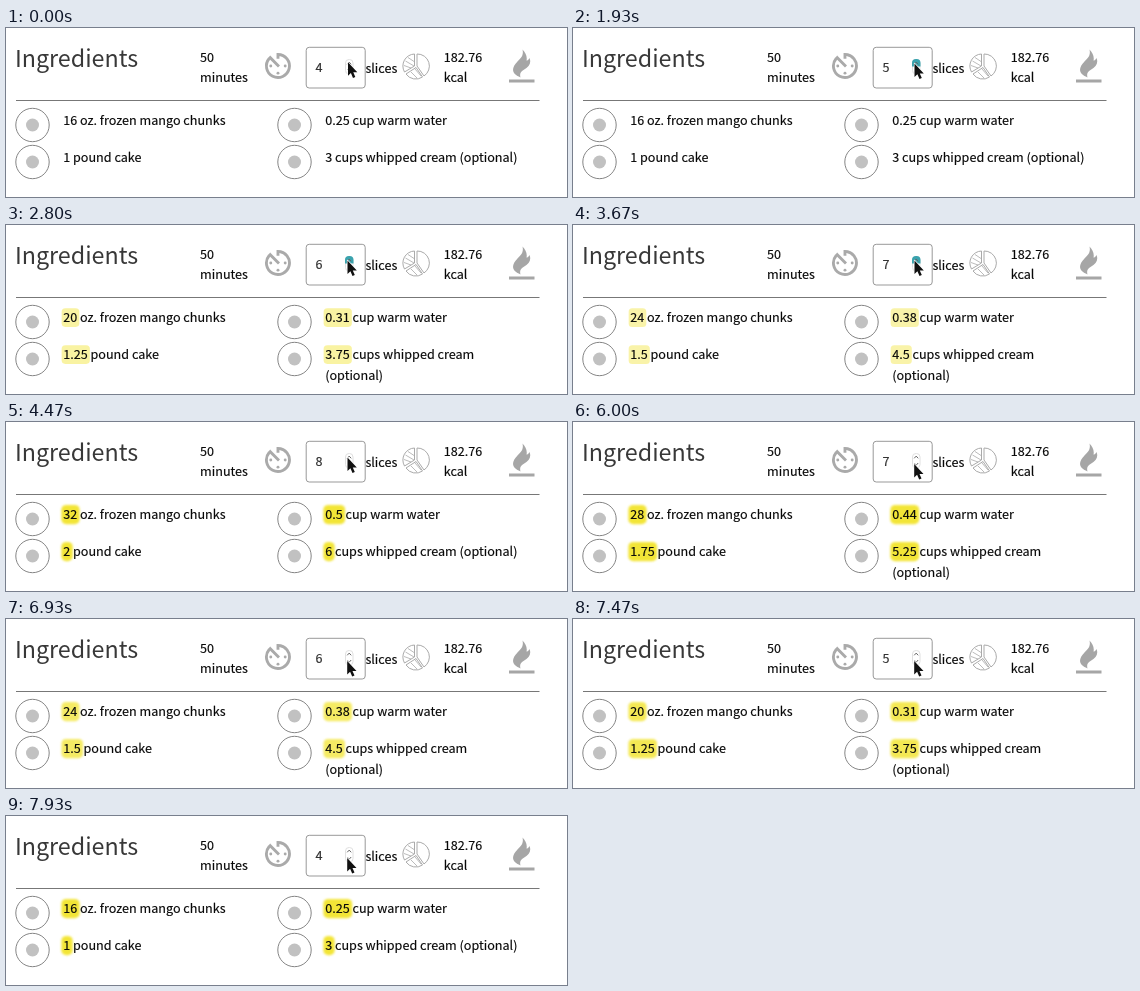
Recreate the animation shown at these times as an HTML page. Size 561 by 169 pixels, loop 8000 ms.

```html
<!DOCTYPE html>
<html lang="en">
<head>
<meta charset="utf-8">
<title>Ingredients</title>
<style>
html, body { margin: 0; width: 100%; height: 100%; overflow: hidden; background: #fff; }
svg { display: block; width: 561px; height: 169px; }
text {
  font: 12.6px "Noto Sans CJK JP", "Noto Sans CJK SC", "Noto Sans CJK", "Noto Sans", sans-serif;
  fill: #080808;
  stroke: #080808;
  stroke-width: .15px;
  white-space: pre;
}
.title { font-size: 23.3px; fill: #383838; stroke: none; }
.value { fill: #333; }
.line { fill: none; stroke: #aaa; }
.ring { fill: #fff; stroke: #858585; }
.dot { fill: #c1c1c1; }
.glow { fill: #f2e42e; }
</style>
</head>
<body>
<svg viewBox="0 0 561 169">
  <defs>
    <clipPath id="upper"><rect x="338" y="30" width="10" height="8.5"/></clipPath>
    <clipPath id="lower"><rect x="338" y="38.5" width="10" height="9"/></clipPath>
  </defs>

  <text class="title" x="8.9" y="38.7">Ingredients</text>
  <text x="194.1" y="34">50</text>
  <text x="194.1" y="54.3">minutes</text>
  <text x="359.4" y="44.5">slices</text>
  <text x="437.7" y="34">182.76</text>
  <text x="437.7" y="54.3">kcal</text>
  <path d="M10 72.5H533.5" stroke="#777"/>

  <!-- timer -->
  <g transform="translate(254.7 20.7) scale(1.44)">
    <path class="line" stroke-width="2" d="M12 7V4A8 8 0 1 1 5.9 6.8M5.9 5.5L12.7 12.3"/>
    <g fill="#aaa"><circle cx="12" cy="17" r="1"/><circle cx="17" cy="12" r="1"/><circle cx="7" cy="12" r="1"/></g>
  </g>

  <!-- pie -->
  <g class="line">
    <path d="M408.5 38V26A12 12 0 0 0 398.500 44ZM410 39.500L400 46A12 12 0 0 0 416.500 49ZM411 38V26A12 12 0 0 1 418 48Z"/>
    <path stroke-width=".8" d="M399.500 33L408 38M402 29.500L408 33.500M398 37.500L405 40M405 44L411 50M409 41L415 48"/>
  </g>

  <!-- flame -->
  <g fill="#a6a6a6">
    <path d="M516.500 21.500c1.500 6-2 9-5 12-5 5-6 10-2 13 1.500 1.500 3 1.500 5 3-1-4 0-5.500 3-7.500 6-3 8-7.500 6-12-1 2-2 2.500-3 2.500 1-4-1-8-4-11z"/>
    <rect x="503" y="51.500" width="25.500" height="3"/>
  </g>

  <!-- stepper -->
  <rect x="300.200" y="19.300" width="59" height="40.700" rx="3" fill="#fff" stroke="#999"/>
  <text class="value" id="value" x="309.600" y="44.400">4</text>
  <rect x="339.500" y="31.500" width="7.500" height="14.500" rx="3.500" fill="#fff" stroke="#e0e0e0"/>
  <rect id="press" x="339" y="31" width="8.500" height="15.500" rx="4" fill="#3aa3ae"/>
  <path class="line" style="stroke:#666" d="M341.200 36.300l2-2.200 2 2.200M341.200 41l2 2.200 2-2.200"/>

  <g id="items"></g>

  <path id="cursor" d="M0 0V13.500L2.900 10.800 5 15.600 7.300 14.600 5.300 9.900H9.300Z"
    fill="#111" stroke="#fff" stroke-width="1.200" stroke-linejoin="round" paint-order="stroke"/>
</svg>
<script>
const LOOP = 8000, FADE = 1300, PRESS = 130;
const byId = id => document.getElementById(id);
const value = byId("value"), press = byId("press"), cursor = byId("cursor");

// [click time, time the amounts follow, servings]
const clicks = [
  [1930, 2070, 5], [2770, 2900, 6], [3600, 3735, 7], [4300, 4420, 8],
  [5870, 5940, 7], [6460, 6590, 6], [7100, 7230, 5], [7740, 7870, 4]
];
// [time, x, y] of the pointer tip
const moves = [
  [0, 342, 34.3], [70, 342, 34.3], [670, 341.7, 43.5], [870, 341.7, 43.5],
  [1000, 341.5, 35.5], [4900, 341.5, 35.5], [5300, 341.2, 42], [LOOP, 341.2, 42]
];

function add(parent, tag, attrs) {
  const el = document.createElementNS("http://www.w3.org/2000/svg", tag);
  setAll(el, attrs);
  return parent.appendChild(el);
}

function setAll(el, attrs) {
  for (const key in attrs) el.setAttribute(key, attrs[key]);
}

function makeItem([x, y, amount, label, tail = ""]) {
  const box = byId("items");
  const left = x + 57.2;
  add(box, "circle", { class: "ring", cx: x + 26.5, cy: y, r: 16.7 });
  add(box, "circle", { class: "dot", cx: x + 26.5, cy: y, r: 6.5 });
  const glow = add(box, "rect", { class: "glow" });
  const text = add(box, "text", { x: left, y });
  const number = add(text, "tspan", {});
  const rest = add(text, "tspan", {});
  const wrapped = add(box, "text", { x: left, y: y + 20.7 });
  return { left, y, amount, label, tail, glow, number, rest, wrapped };
}

const items = [
  [0, 97, 16, "oz. frozen mango chunks"],
  [262, 97, 0.25, "cup warm water"],
  [0, 134, 1, "pound cake"],
  [262, 134, 3, "cups whipped cream", "(optional)"]
].map(makeItem);

let shown;
function setServings(n) {
  if (n === shown) return;
  shown = n;
  for (const it of items) {
    const amount = String(+(it.amount * n / 4).toFixed(2));
    const wraps = it.tail && amount.length > 1;
    it.number.textContent = amount;
    it.rest.textContent = " " + it.label + (it.tail && !wraps ? " " + it.tail : "");
    it.wrapped.textContent = wraps ? it.tail : "";
  }
}

function setGlow(strength) {
  const pad = 1.6 + 0.6 * strength, height = 15 + 2 * pad;
  for (const it of items) {
    setAll(it.glow, {
      x: it.left + 0.3 - pad,
      y: it.y - 4.4 - height / 2,
      width: it.number.getComputedTextLength() + 2 * pad,
      height,
      rx: 2.5 + 2.5 * strength,
      opacity: strength
    });
    it.glow.style.filter = `blur(${0.4 + 0.9 * strength}px)`;
  }
}

function pointerAt(t) {
  const i = moves.findIndex(m => m[0] > t);
  const [t0, x0, y0] = moves[i - 1], [t1, x1, y1] = moves[i];
  const p = (t - t0) / (t1 - t0), e = p * p * (3 - 2 * p);
  return [x0 + (x1 - x0) * e, y0 + (y1 - y0) * e];
}

function draw(t) {
  const click = clicks.filter(c => c[0] <= t).pop();
  const update = clicks.filter(c => c[1] <= t).pop();
  value.textContent = click ? click[2] : 4;
  setServings(update ? update[2] : 4);
  setGlow(update ? Math.max(0, 1 - (t - update[1]) / FADE) : 0);

  const pressed = click && t - click[0] < PRESS;
  press.style.display = pressed ? "" : "none";
  press.setAttribute("clip-path", t < 5000 ? "url(#upper)" : "url(#lower)");
  cursor.setAttribute("transform", `translate(${pointerAt(t)})`);
}

const start = performance.now();
function tick() {
  draw((performance.now() - start) % LOOP);
  requestAnimationFrame(tick);
}
tick();
</script>
</body>
</html>
```
